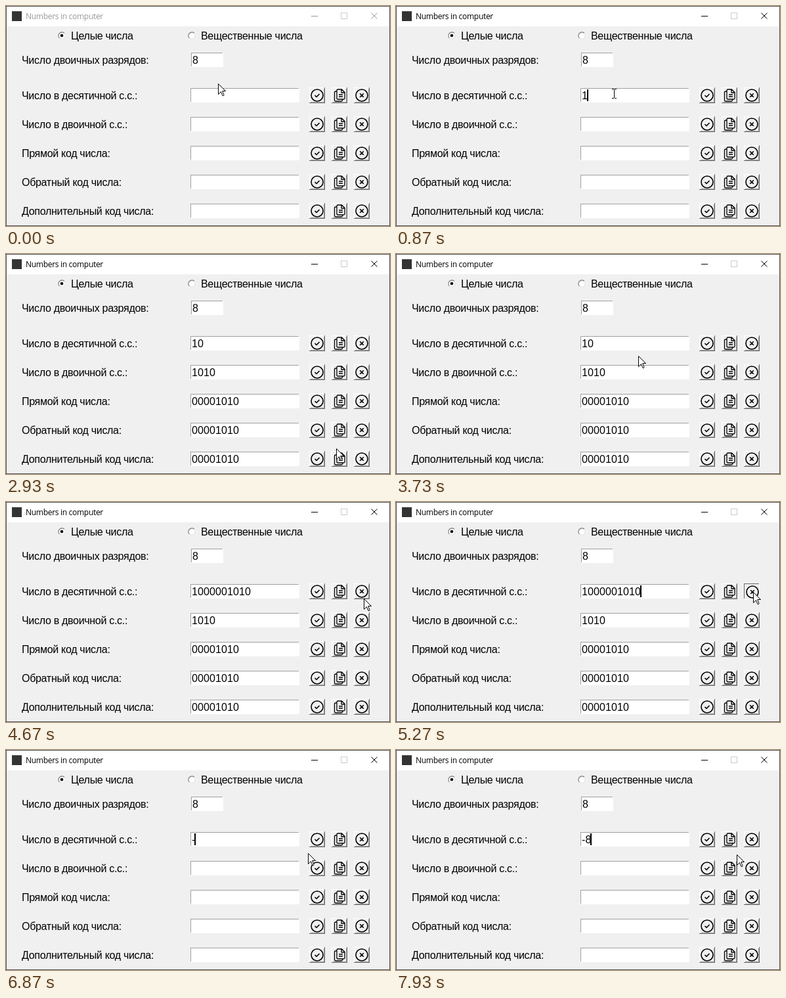
Write an HTML page that moves like this. It is 585 px wide and 335 px high and loops after 8 s.

```html
<!DOCTYPE html>
<html lang="ru">
<head>
<meta charset="utf-8">
<title>Numbers in computer</title>
<style>
  html, body { margin: 0; width: 100%; height: 100%; overflow: hidden; background: #f0f0f0; }
  svg { display: block; width: 585px; height: 335px; }
  text { font: 16px "Liberation Sans", Arial, sans-serif; letter-spacing: -.3px; fill: #000; white-space: pre; }
  .value { letter-spacing: .1px; }
  .title { font: 12px "Open Sans", "Noto Sans", sans-serif; }
  .crisp { shape-rendering: crispEdges; }
  .icon { fill: none; stroke: #000; stroke-width: 1.6; stroke-linejoin: round; }
</style>
</head>
<body>
<svg id="stage" viewBox="0 0 585 335" xmlns="http://www.w3.org/2000/svg"></svg>
<script>
const LOOP = 8000;
const TICKS_PER_MS = 15 / 1000;
const ROWS = [136, 180, 224, 268, 312];
const LABELS = ["Число в десятичной с.с.:", "Число в двоичной с.с.:", "Прямой код числа:",
  "Обратный код числа:", "Дополнительный код числа:"];
const FIELD = { left: 281, right: 447, textX: 283 };
const BUTTON_X = [462, 496, 530];

// All times below are in ticks of 1/15 s.
const POINTER = [
  [0, 323, 118], [4, 332, 133], [17, 332, 133], [27, 466, 130], [31, 466, 130],
  [44, 503, 296], [47, 507, 314], [49, 507, 314], [53, 379, 165], [54, 379, 165],
  [59, 351, 137], [64, 351, 137], [70, 545, 147], [72, 544, 137], [90, 544, 137],
  [91, 522, 148], [98, 469, 164], [99, 469, 164], [102, 458, 156], [106, 469, 164],
  [108, 469, 164], [110, 519, 163], [118, 519, 163], [119, 519, 159]
];
const INPUT = [[0, ""], [13, "1"], [14, "10"], [60, "1000001010"], [81, ""], [101, "-"], [105, "-8"]];
const RESULTS = ["1010", "00001010", "00001010", "00001010"];
const RESULTS_SHOWN = [29, 81];
const CARET_ON = [[5, 14], [18, 27], [32, 41], [45, 55], [60, 69], [73, 82], [87, 96], [100, 110], [115, 121]];
const PRESSES = [
  { row: 0, col: 0, from: 27, to: 29 },
  { row: 4, col: 1, from: 48, to: 50 },
  { row: 0, col: 2, from: 79, to: 81 }
];
const ACTIVE_FROM = 4;

const stage = document.getElementById("stage");

function add(tag, attrs, parent = stage) {
  const node = document.createElementNS("http://www.w3.org/2000/svg", tag);
  for (const key in attrs) node.setAttribute(key, attrs[key]);
  parent.appendChild(node);
  return node;
}
const rect = (x, y, width, height, fill, parent) =>
  add("rect", { x, y, width, height, fill, class: "crisp" }, parent);
const path = (d, attrs, parent) => add("path", { d, ...attrs }, parent);
function label(x, y, content, cls = "") {
  const node = add("text", { x, y, class: cls });
  node.textContent = content;
  return node;
}

function entry(x, y, w, h) {
  rect(x, y, w, h, "#fff");
  rect(x, y, w - 1, 1, "#a0a0a0");
  rect(x, y, 1, h - 1, "#a0a0a0");
}

function radio(x, y, checked) {
  add("circle", { cx: x, cy: y, r: 5.2, fill: "#fff", stroke: "#e3e3e3" });
  path(`M${x - 3.8} ${y + 3.8}A5.4 5.4 0 0 1 ${x + 3.8} ${y - 3.8}`,
    { fill: "none", stroke: "#808080", "stroke-width": 1.3 });
  if (checked) add("circle", { cx: x, cy: y, r: 2.3, fill: "#000" });
}

const RING = "M3 12a9 9 0 1 0 18 0a9 9 0 1 0 -18 0";
const ICONS = [
  RING + "M8.5 12l2.5 2.5 4.5-4.5",
  "M9.5 3H15.500L20 7.500V16.500Q20 18 18.500 18H9.500Q8 18 8 16.500V4.500Q8 3 9.500 3z".replace(/00/g, "") +
    "M8 6H6Q4.5 6 4.5 7.5V19.5Q4.5 21 6 21H15Q16.5 21 16.5 19.5V18M15 3V8H20M11 11H17M11 14H17",
  RING + "M9.2 9.2l5.6 5.6M14.8 9.2l-5.6 5.6"
];

function button(x, y, col) {
  const g = add("g", { transform: `translate(${x} ${y})` });
  rect(0, 0, 24, 24, "#f0f0f0", g);
  const bevel = (d, stroke) => path(d, { fill: "none", stroke, class: "crisp" }, g);
  const light = bevel("M.5 23V.5H23", "#fff");
  const shade = bevel("M1.5 22.5H22.5V1.5", "#a0a0a0");
  const dark = bevel("M0 23.5H23.5V0", "#696969");
  const icon = path(ICONS[col], { class: "icon" }, g);
  if (col === 1) icon.style.strokeWidth = 1.3;
  return pressed => {
    light.setAttribute("stroke", pressed ? "#696969" : "#fff");
    shade.setAttribute("stroke", pressed ? "#e3e3e3" : "#a0a0a0");
    dark.setAttribute("stroke", pressed ? "#fff" : "#696969");
    icon.setAttribute("transform", pressed ? "translate(1 1)" : "");
  };
}

// Window frame and title bar
rect(0, 0, 585, 335, "#f0f0f0");
rect(0, 0, 585, 31, "#fff");
rect(9, 8, 15, 15, "#333");
const title = label(30, 20, "Numbers in computer", "title");
const controls = path("M465 15.5h10M556.5 10.5l9 9M565.5 10.5l-9 9", { fill: "none" });
path("M510.5 10.5h9v9h-9z", { fill: "none", stroke: "#ccc", class: "crisp" });
path("M.5 .5H584.5V334.5H.5z", { fill: "none", stroke: "#555", class: "crisp" });

// Form
radio(85, 45, true);
label(99, 51, "Целые числа");
radio(283, 45, false);
label(297, 51, "Вещественные числа");
label(24, 88, "Число двоичных разрядов:");
entry(282, 71, 49, 22);
label(284, 88, "8", "value");

const values = [];
const buttons = [];
ROWS.forEach((y, row) => {
  label(24, y + 6, LABELS[row]);
  entry(FIELD.left, y - 11, FIELD.right - FIELD.left, 22);
  values.push(label(FIELD.textX, y + 6, "", "value"));
  buttons.push(BUTTON_X.map((x, col) => button(x, y - 12, col)));
});
const caret = rect(0, 127, 2, 18, "#000");
const arrow = path("M.5 .5V16.5L4.5 12.5L7 18.5H8.5L9 17.5L6.8 11.5H11.5z",
  { fill: "#fff", stroke: "#000" });
const beam = path("M-3 -6.5H0M1 -6.5H4M.5 -6V7M-3 7.5H0M1 7.5H4",
  { fill: "none", stroke: "#000", class: "crisp" });

const within = (t, [from, to]) => t >= from && t < to;

function pointerAt(t) {
  const next = POINTER.findIndex(p => p[0] > t);
  if (next < 0) return POINTER[POINTER.length - 1].slice(1);
  const [t0, x0, y0] = POINTER[next - 1];
  const [t1, x1, y1] = POINTER[next];
  const u = (t - t0) / (t1 - t0);
  const k = u * u * (3 - 2 * u);
  return [Math.round(x0 + (x1 - x0) * k), Math.round(y0 + (y1 - y0) * k)];
}

function caretX(content) {
  const width = [...content].reduce((sum, c) => sum + (c === "-" ? 5.4 : 9), 0);
  return Math.floor(FIELD.textX - 0.5 + width);
}

function draw(ms) {
  const t = Math.floor(ms * TICKS_PER_MS + 0.1);
  const ink = t >= ACTIVE_FROM ? "#000" : "#999";
  title.style.fill = ink;
  controls.setAttribute("stroke", ink);

  const typed = INPUT.filter(step => step[0] <= t).pop()[1];
  values[0].textContent = typed;
  RESULTS.forEach((value, i) => {
    values[i + 1].textContent = within(t, RESULTS_SHOWN) ? value : "";
  });
  caret.setAttribute("x", caretX(typed));
  caret.style.display = CARET_ON.some(span => within(t, span)) ? "" : "none";

  for (const p of PRESSES) buttons[p.row][p.col](within(t, [p.from, p.to]));

  const [x, y] = pointerAt(t);
  const overField = x >= FIELD.left && x < FIELD.right && ROWS.some(row => Math.abs(y - row) < 11);
  arrow.style.display = overField ? "none" : "";
  beam.style.display = overField ? "" : "none";
  (overField ? beam : arrow).setAttribute("transform", `translate(${x} ${y})`);
}

const start = performance.now();
function loop() {
  draw((performance.now() - start) % LOOP);
  requestAnimationFrame(loop);
}
draw(0);
requestAnimationFrame(loop);
</script>
</body>
</html>
```
